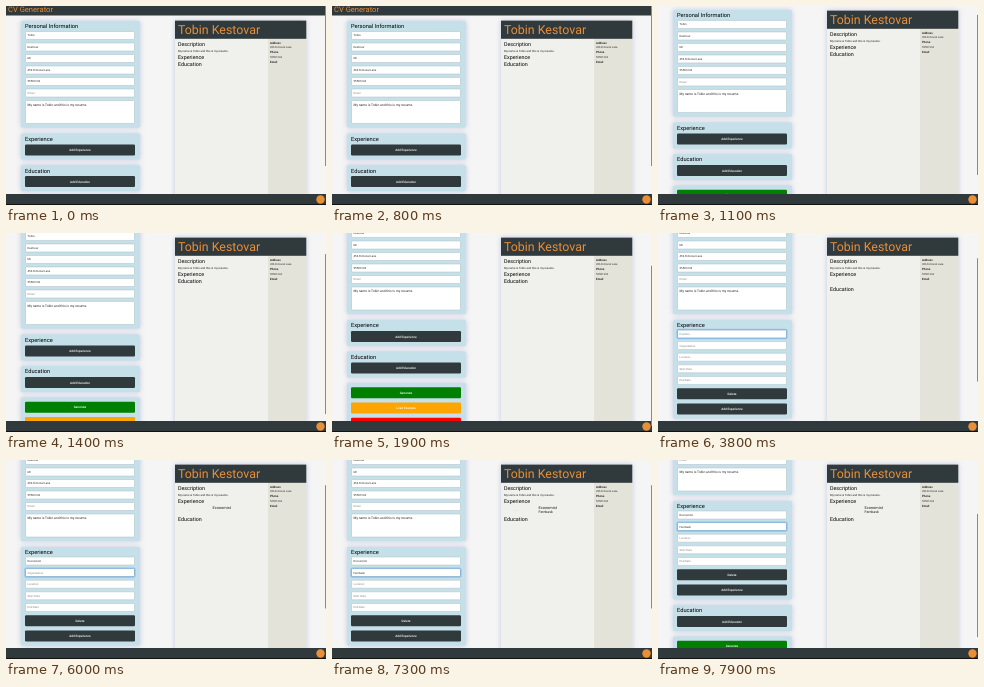
An HTML page for the animation above (8000 ms loop, 320 by 199 pixels).

```html
<!DOCTYPE html>
<html lang="en">
<head>
<meta charset="utf-8">
<title>CV Generator</title>
<style>
html, body { margin: 0; width: 100%; height: 100%; overflow: hidden; background: #f5f5f5; }
svg { display: block; width: 320px; height: 199px; }
text { font-family: Roboto, Arial, sans-serif; text-rendering: geometricPrecision; }
.card, .paper { filter: drop-shadow(0 0 2.5px rgba(140, 155, 205, .5)); }
</style>
</head>
<body>
<svg id="stage" viewBox="0 0 320 199"></svg>
<script>
const LOOP = 8000;
const DARK = '#30393c', ORANGE = '#e88f38', BLUE = '#c5e0e8';
const FIRST = 'Tobin', LAST = 'Kestovar', ADDRESS = '456 Fictional Lane', PHONE = '55501234';
const ABOUT = `My name is ${FIRST} and this is my resume.`;
const stage = document.getElementById('stage');

const rect = (x, y, w, h, fill, extra = '') =>
  `<rect x="${x}" y="${y}" width="${w}" height="${h}" fill="${fill}" ${extra}/>`;

// y is the middle of the capital letters
const text = (x, y, size, str, fill = '#1b1b1b', extra = '') =>
  `<text x="${x}" y="${y + size * .355}" font-size="${size}" fill="${fill}" ${extra}>${str}</text>`;

const heading = (x, y, str, size = 5.7) => text(x, y, size, str, '#000');

const card = (y, h) => rect(15, y, 119, h, BLUE, 'rx="1.5" class="card"');

const box = (y, h, focus) => (focus
  ? rect(18.8, y - .7, 110.4, h + 1.4, 'none', 'rx="1.2" stroke="#8fc0ee" stroke-width=".8"') : '') +
  rect(19.5, y, 109, h, '#fff', `rx=".8" stroke="${focus ? '#3f7fc0' : '#a9bcc2'}" stroke-width=".5"`);

const field = (y, value, hint = '', focus = false) => box(y - 4, 8, focus) +
  text(21.5, y, 2.8, value || hint, value ? '#222' : '#808080');

const button = (y, label, fill = DARK) => rect(19, y - 5.5, 110, 11, fill, 'rx="1.2"') +
  text(74, y, 3.1, label, '#fff', 'text-anchor="middle" font-weight="500"');

// Piecewise linear value through [time, value] points
function along(t, points) {
  let [t0, v0] = points[0];
  for (const [t1, v1] of points) {
    if (t < t1) return t <= t0 ? v0 : v0 + (v1 - v0) * (t - t0) / (t1 - t0);
    [t0, v0] = [t1, v1];
  }
  return v0;
}

const typed = (t, str, start, step) =>
  str.slice(0, Math.max(0, Math.floor((t - start) / step) + 1));

function form(s) {
  const grow = s.open ? 72.4 : 0;
  let out = card(15, 106.5) + heading(19, 20.1, 'Personal Information');
  [FIRST, LAST, 'Mr', ADDRESS, PHONE, ''].forEach((v, i) => out += field(29.5 + i * 11.5, v, 'Email'));
  out += box(94.5, 23) + text(21.5, 98.5, 3.3, ABOUT, '#222');

  out += card(127.5, 26 + grow) + heading(19, 132.8, 'Experience');
  if (s.open) {
    const values = [s.job, s.firm];
    ['Position', 'Organization', 'Location', 'Start Date', 'End Date'].forEach((hint, i) =>
      out += field(141.5 + i * 11.6, values[i], hint, s.focus === i));
    out += button(201.2, 'Delete');
  }
  out += button(144 + grow, 'Add Experience');

  out += card(159 + grow, 26) + heading(19, 164.5 + grow, 'Education') + button(175.5 + grow, 'Add Education');
  out += card(190.5 + grow, 50);
  [['Generate', 'green'], ['Load Example', 'orange'], ['Reset', 'red']].forEach(([label, fill], i) =>
    out += button(200.3 + grow + i * 15.2, label, fill));
  return out;
}

function paper(s) {
  const entry = !s.open ? 48.5 : s.job ? 59.6 : 56;
  const side = (y, str, bold) => text(264, y, bold ? 2.9 : 2.65, str, '#222', bold ? 'font-weight="600"' : '');
  return rect(169, 4.6, 131.3, 187, '#f0f0ec', 'class="paper"') +
    rect(262, 22.8, 38.3, 169, '#e4e3da') +
    rect(169, 4.6, 131.3, 18.2, DARK) +
    text(172, 13.6, 12.4, `${FIRST} ${LAST}`, ORANGE) +
    heading(172, 28.6, 'Description', 5.35) + text(172, 35, 2.8, ABOUT) +
    heading(172, 41.1, 'Experience', 5.35) +
    text(183.6, 50, 2.6, s.job && '-') +
    text(206.5, 48, 3.9, s.job) + text(206.5, 52, 3.5, s.firm) +
    heading(172, entry, 'Education', 5.35) +
    side(27.2, 'Address', true) + side(31, ADDRESS) +
    side(36, 'Phone', true) + side(41, PHONE) + side(45.5, 'Email', true);
}

function draw(t) {
  const scroll = along(t, [[900, 0], [1100, 11], [1400, 26], [1700, 40.5], [7500, 40.5], [7900, 86.5]]);
  const s = {
    open: t >= 2700,
    focus: t < 3400 ? -1 : t < 5700 ? 0 : 1,
    job: typed(t, 'Economist', 4700, 100),
    firm: typed(t, 'Fernbask', 6200, 150)
  };
  const page = s.open ? 318 : 245;
  stage.innerHTML = rect(0, 0, 320, 199, '#f5f5f5') +
    `<g transform="translate(0 ${-scroll})">` +
    rect(0, 0, 320, 9.5, DARK) + text(2, 3, 7.6, 'CV Generator', ORANGE) + form(s) + '</g>' +
    `<g transform="translate(0 ${Math.max(0, 10 - scroll)})">${paper(s)}</g>` +
    rect(0, 188, 320, 10, DARK) + rect(0, 198, 320, 1, '#111') +
    `<circle cx="314.5" cy="193.5" r="4.2" fill="${ORANGE}"/>` +
    rect(319, scroll * 198 / page, 1, 198 * 198 / page, '#8a8a8a');
}

const begin = performance.now();
function tick() {
  draw((performance.now() - begin) % LOOP);
  requestAnimationFrame(tick);
}
tick();
</script>
</body>
</html>
```
